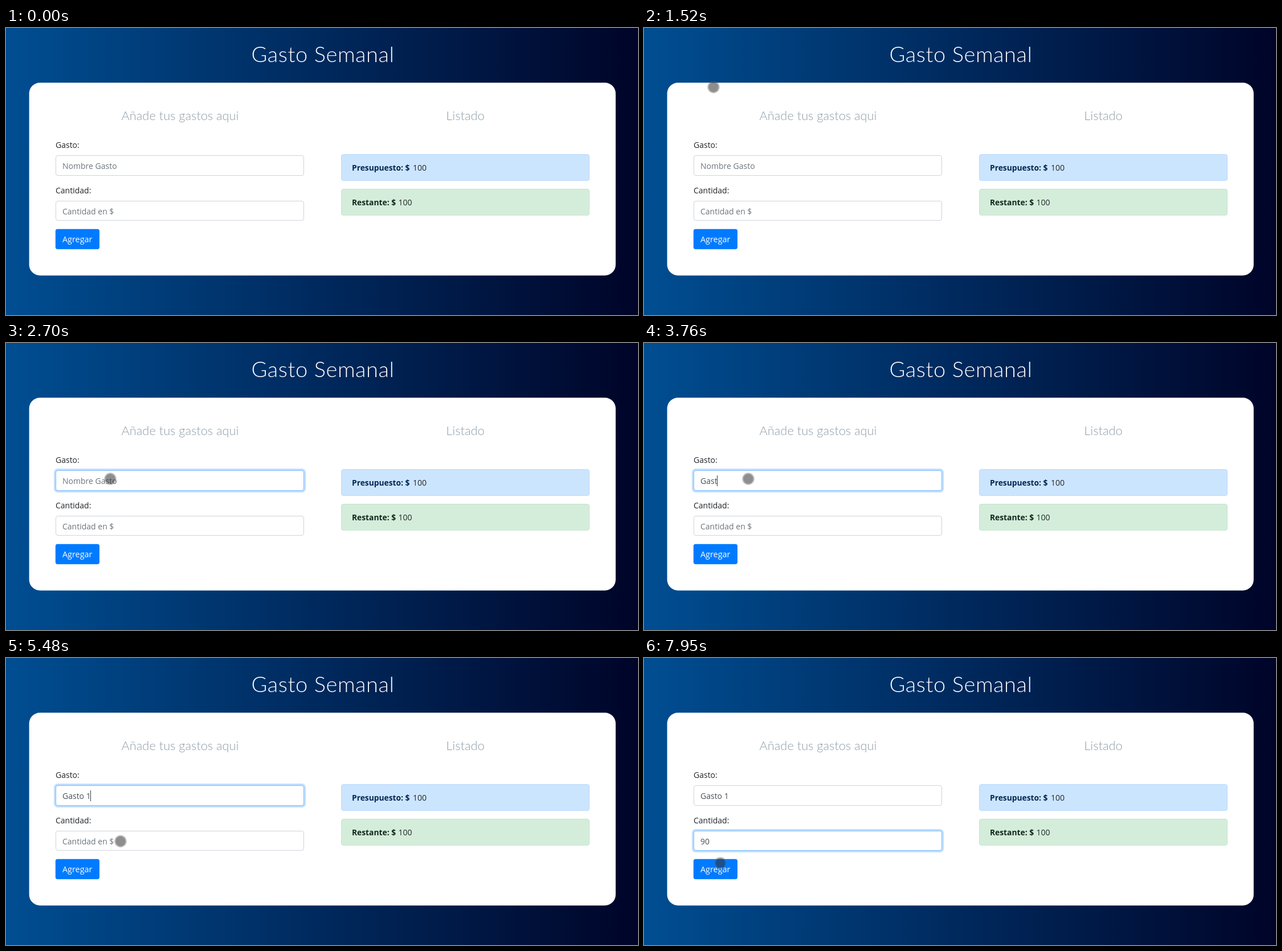
Write an HTML page with a canvas that moves like this. It is 1109x505 px and loops after 8000 ms.

```html
<!DOCTYPE html>
<html lang="es">
<head>
<meta charset="utf-8">
<title>Gasto Semanal</title>
<style>
html, body { margin: 0; width: 100%; height: 100%; overflow: hidden; background: #000428; }
canvas { display: block; }
</style>
</head>
<body>
<canvas id="stage" width="1109" height="505"></canvas>
<script>
const ctx = document.getElementById('stage').getContext('2d');
const LOOP = 8000;
const BODY = '14px "Open Sans", sans-serif';
const BOLD = '700 13.8px "Open Sans", sans-serif';
const INK = '#212529';

const FIELDS = [
  { label: 'Gasto:', hint: 'Nombre Gasto', y: 224, height: 36, focusAt: 2210, blurAt: 5590 },
  { label: 'Cantidad:', hint: 'Cantidad en $', y: 304, height: 35, focusAt: 5600, blurAt: Infinity }
];

// [time, field, text, caret visible]
const TYPING = [
  [2190, 0, '', true], [2700, 0, '', false],
  [3120, 0, 'g', true], [3210, 0, '', true],
  [3350, 0, 'G', true], [3440, 0, 'Ga', true], [3540, 0, 'Gas', true],
  [3760, 0, 'Gast', true], [3910, 0, 'Gasto', true],
  [4100, 0, 'Gasto ', true], [4510, 0, 'Gasto 1', true],
  [4980, 0, 'Gasto 1', false], [5480, 0, 'Gasto 1', true],
  [5580, 1, '', true], [6190, 1, '', false], [6650, 1, '', true],
  [6930, 1, '9', true], [7160, 1, '90', true], [7670, 1, '90', false]
];

// The pointer advances in discrete steps and rests on the last point.
const MOVES = [
  { start: 490, end: 630, steps: 4, path: [[1036, 450], [860, 275], [667, 122], [453, 17]] },
  { start: 1380, end: 1520, steps: 4, path: [[85, 48], [122, 104]] },
  { start: 1700, end: 2040, steps: 8, path: [[125, 107], [131, 113], [150, 172], [165, 211], [180, 234], [183, 239]] },
  { start: 4980, end: 5120, steps: 4, path: [[184, 250], [192, 345]] },
  { start: 5300, end: 5480, steps: 5, path: [[193, 342], [201, 322.5]] },
  { start: 7670, end: 7950, steps: 7, path: [[200, 323], [170, 342], [134, 361]] }
];

const clamp = v => Math.max(0, Math.min(1, v));
const easeOut = p => 1 - (1 - p) ** 2;
const mix = (a, b, p) => a + (b - a) * p;

function text(str, x, y, color, font = BODY, align = 'left') {
  ctx.font = font;
  ctx.fillStyle = color;
  ctx.textAlign = align;
  ctx.fillText(str, x, y);
}

function box(x, y, w, h, radius, fill, stroke) {
  ctx.beginPath();
  ctx.roundRect(x, y, w, h, radius);
  ctx.fillStyle = fill;
  ctx.fill();
  if (!stroke) return;
  ctx.strokeStyle = stroke;
  ctx.lineWidth = 1;
  ctx.stroke();
}

function drawPage() {
  const sky = ctx.createLinearGradient(0, 0, 1109, 0);
  sky.addColorStop(0, '#004e92');
  sky.addColorStop(1, '#000428');
  ctx.fillStyle = sky;
  ctx.fillRect(0, 0, 1109, 505);

  ctx.letterSpacing = '0.6px';
  text('Gasto Semanal', 556, 60, '#fff', '300 38px Lato, sans-serif', 'center');
  ctx.letterSpacing = '0px';

  box(40.6, 96.2, 1029.2, 339.2, 19, '#fff');
  const heading = '300 21.8px Lato, sans-serif';
  text('Añade tus gastos aqui', 305.5, 162, '#8b9ca8', heading, 'center');
  text('Listado', 806, 162, '#8b9ca8', heading, 'center');

  box(588.5, 222.5, 435, 46, 3.5, '#cce5ff', '#b8daff');
  text('Presupuesto: $', 607, 251, '#002752', BOLD);
  text('100', 714, 251, INK);
  box(588.5, 283.5, 435, 46, 3.5, '#d4edda', '#c3e6cb');
  text('Restante: $', 607, 312, '#12261c', BOLD);
  text('100', 688.5, 312, INK);

  box(86.8, 353.7, 77.2, 35.5, 3.7, '#007bff');
  text('Agregar', 99, 377, '#fff', '14.4px "Open Sans", sans-serif');
}

function drawField(field, t, value, caret) {
  const { y, height } = field;
  const glow = easeOut(clamp((t - field.focusAt) / 150)) * (1 - easeOut(clamp((t - field.blurAt) / 150)));
  const grow = 3 * glow;
  const border = `rgb(${mix(206, 128, glow)}, ${mix(212, 189, glow)}, ${mix(218, 255, glow)})`;

  text(field.label, 87, y - 13, INK);
  box(87 - grow, y - grow, 436 + 2 * grow, height + 2 * grow, 3.7 + grow, `rgba(0, 123, 255, ${0.25 * glow})`);
  box(87.5, y + 0.5, 435, height - 1, 3.5, '#fff', border);
  text(value || field.hint, 99, y + 23.5, value ? '#495057' : '#6c757d');
  if (caret) {
    ctx.fillStyle = '#343a40';
    ctx.fillRect(Math.floor(99 + ctx.measureText(value).width), y + 9, 1, 19);
  }
}

function pointerAt(t) {
  if (t >= 680 && t < 1380) return null;
  const move = MOVES.findLast(m => t >= m.start);
  if (!move) return null;
  const { start, end, steps, path } = move;
  const step = Math.floor((t - start) / (end - start) * (steps - 1) + 0.01);
  const place = clamp(step / (steps - 1)) * (path.length - 1);
  const i = Math.min(Math.floor(place), path.length - 2);
  return [0, 1].map(axis => mix(path[i][axis], path[i + 1][axis], place - i));
}

function drawPointer(t) {
  const point = pointerAt(t);
  if (!point) return;
  ctx.beginPath();
  ctx.arc(...point, 8.9, 0, 2 * Math.PI);
  ctx.fillStyle = 'rgba(50, 50, 50, 0.55)';
  ctx.fill();
  ctx.beginPath();
  ctx.arc(...point, 9.8, 0, 2 * Math.PI);
  ctx.strokeStyle = 'rgba(100, 100, 100, 0.42)';
  ctx.lineWidth = 1.8;
  ctx.stroke();
}

function draw(t) {
  drawPage();
  const past = TYPING.filter(([time]) => time <= t);
  const latest = past.at(-1);
  FIELDS.forEach((field, i) => {
    const entry = past.findLast(([, index]) => index === i);
    drawField(field, t, entry ? entry[2] : '', entry && entry === latest && entry[3]);
  });
  drawPointer(t);
}

const begin = performance.now();
function frame() {
  draw((performance.now() - begin) % LOOP);
  requestAnimationFrame(frame);
}
frame();
</script>
</body>
</html>
```
